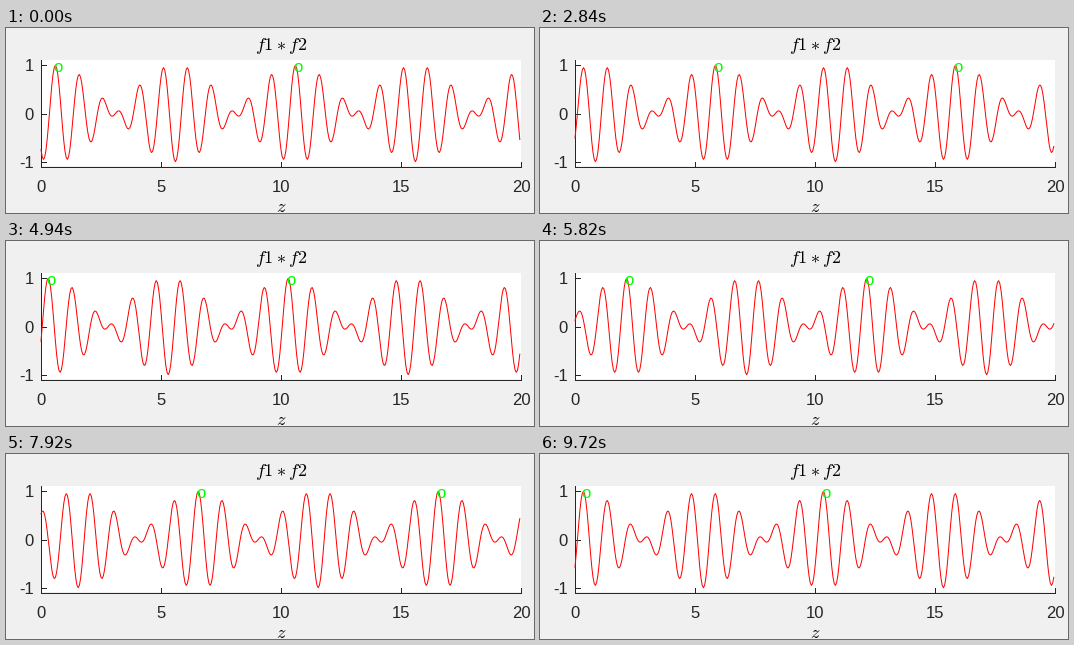
Recreate the animation shown at these times as a matplotlib script. Size 528x185 px, loop 9.82 s.

```python
import numpy as np
import matplotlib.pyplot as plt
from matplotlib.animation import FuncAnimation
from matplotlib.patches import Rectangle

W, H, DPI = 528, 185, 100
LOOP, TICK = 9820, 20
PX = 72 / DPI                      # points per pixel
INK = "#262626"
LEFT, RIGHT, TOP, BOTTOM = 34.5, 514.5, 32, 138.5

fig = plt.figure(figsize=(W / DPI, H / DPI), dpi=DPI, facecolor="#f0f0f0")
ax = fig.add_axes([0, 0, 1, 1])
ax.set(xlim=(0, W), ylim=(H, 0))
ax.axis("off")


def to_x(z):
    return 35 + 24 * z


def to_y(v):
    return 85.5 - 48.2 * v


def rule(xs, ys):
    ax.plot(xs, ys, color=INK, lw=PX, zorder=2)


def label(x, y, s, size=16.67, color=INK, ha="center", **kw):
    return ax.text(x, y, s, fontsize=size * PX, color=color, ha=ha,
                   va="baseline", family="Liberation Sans", **kw)


# Axes frame, ticks and labels
ax.add_patch(Rectangle((35, TOP), 480, 106, fc="white", ec="none", zorder=1))
rule([LEFT, LEFT], [TOP, BOTTOM])
rule([LEFT, RIGHT], [BOTTOM, BOTTOM])
for z in range(0, 21, 5):
    x = LEFT + 24 * z
    rule([x, x], [BOTTOM, BOTTOM - 5])
    label(x + 0.5, 164, str(z))
for v in (-1, 0, 1):
    y = to_y(v)
    rule([LEFT, LEFT + 5], [y, y])
    label(28, y + 6, str(v), ha="right")
label(275, 22, "$f1*f2$", 18.3, "black", math_fontfamily="cm")
label(275, 184, "$z$", 18.3, "black", math_fontfamily="cm")

# Steps last 100, 100 and 20 ms in turn, with one shortened near the end
k = np.arange(134)
starts = 220 * (k // 3) + 100 * (k % 3) - 60 * (k >= 127)

# Travel of the crest, snapped to the sampling grid of z
GRID = 0.05
knots = [0, 16, 38, 65, 67, 91, 108, 130, 133]
travel = [0.6, 2.85, 5.85, 9.95, 10.3, 14.0, 16.55, 19.9, 20.35]
crest = np.round(np.interp(k, knots, travel) / GRID) * GRID

z = np.arange(400) * GRID
curve, = ax.plot([], [], color="red", lw=PX, zorder=3)
marks = [label(0, 44, "o", color="#00ff00", zorder=4) for _ in range(2)]


def update(frame):
    step = np.searchsorted(starts, frame * TICK, side="right") - 1
    z0 = crest[step]
    u = z - z0
    wave = np.cos(2 * np.pi * u) * np.cos(0.2 * np.pi * u)
    curve.set_data(to_x(z), to_y(wave))
    for i, mark in enumerate(marks):
        mark.set_x(to_x(z0 % 10 + 10 * i) + 2.6)
    return [curve, *marks]


anim = FuncAnimation(fig, update, frames=LOOP // TICK, interval=TICK,
                     repeat=True, repeat_delay=0, blit=False)
plt.show()
```
